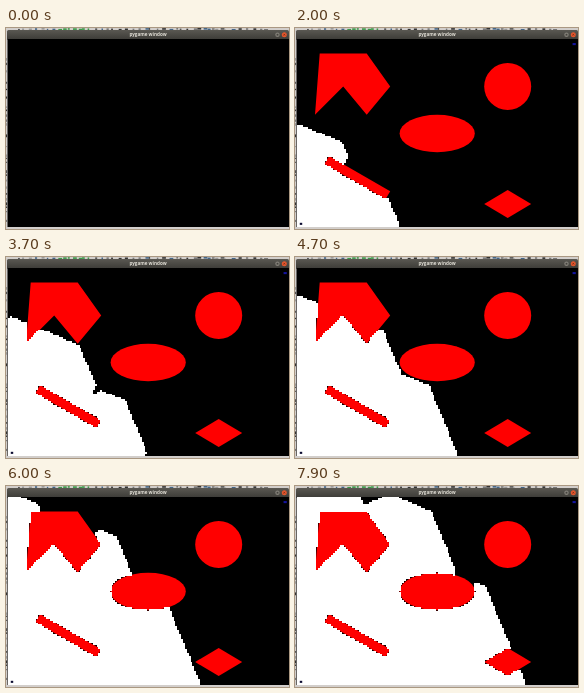
An HTML page that plays this animation: 283x201 px, repeating every 8 s.

```html
<!DOCTYPE html>
<html lang="en">
<head>
<meta charset="utf-8">
<title>Path search</title>
<style>
html, body { margin: 0; width: 100%; height: 100%; overflow: hidden; background: #d2cecb; }
svg { display: block; width: 100%; height: 100%; }
</style>
</head>
<body>
<svg viewBox="0 0 283 201">
  <defs>
    <linearGradient id="bar" x2="0" y2="1">
      <stop offset="0" stop-color="#5a5852"/>
      <stop offset="1" stop-color="#3b3a36"/>
    </linearGradient>
    <clipPath id="view"><rect x="2" y="11" width="281" height="188"/></clipPath>
  </defs>
  <rect width="283" height="201" fill="#d2cecb"/>
  <g id="flecks"></g>
  <rect x="1" y="2" width="282" height="10" rx="1.5" fill="url(#bar)"/>
  <text x="142" y="8.4" font-family="'Open Sans', 'Noto Sans', sans-serif" font-size="4.6" font-weight="700" fill="#e2dfd6" text-anchor="middle">pygame window</text>
  <circle cx="271.5" cy="6.7" r="2.2" fill="#85827a"/>
  <rect x="270.6" y="5.8" width="1.8" height="1.8" fill="#44423d"/>
  <circle cx="278.3" cy="6.7" r="2.5" fill="#e4572e"/>
  <path d="M277.4 5.8l1.8 1.8m0-1.8l-1.8 1.8" stroke="#6b2410" stroke-width=".6"/>
  <rect x="1.5" y="11" width="281.5" height="188" fill="#000"/>
  <g id="scene" clip-path="url(#view)">
    <g transform="translate(1.2 199.5) scale(.94 -.94)">
      <g id="shapes" fill="#f00"></g>
      <path id="flood" fill="#fff" shape-rendering="crispEdges"/>
      <rect x="3.8" y="2.8" width="2.6" height="2.2" fill="#0a0a30"/>
      <rect x="294" y="194" width="3.4" height="2.2" fill="#1414a0"/>
    </g>
  </g>
</svg>
<script>
const LOOP = 8000, STEP = 100, CELL = 2, COLS = 151, ROWS = 101, START = 4;
const $ = id => document.getElementById(id);

const polys = [
  [[25, 185], [75, 185], [100, 150], [75, 120], [50, 150], [20, 120]],
  [[30, 67.5], [35, 76], [100, 38.6], [95, 30]],
  [[225, 10], [200, 25], [225, 40], [250, 25]]
];
const ovals = [[225, 150, 25, 25], [150, 100, 40, 20]];

$('shapes').innerHTML =
  polys.map(p => `<polygon points="${p.join(' ')}"/>`).join('') +
  ovals.map(([x, y, a, b]) => `<ellipse cx="${x}" cy="${y}" rx="${a}" ry="${b}"/>`).join('');

function inPoly(p, x, y) {
  let inside = false;
  p.forEach(([ax, ay], i) => {
    const [bx, by] = p[(i + 1) % p.length];
    if ((ay > y) !== (by > y) && x < ax + (bx - ax) * (y - ay) / (by - ay)) inside = !inside;
  });
  return inside;
}
const blocked = (x, y) => polys.some(p => inPoly(p, x, y)) ||
  ovals.some(([cx, cy, a, b]) => ((x - cx) / a) ** 2 + ((y - cy) / b) ** 2 <= 1);

// Shortest 8-way distance from the start, relaxed in alternating sweeps.
function distances() {
  const n = COLS * ROWS, dist = new Float64Array(n).fill(Infinity), wall = [];
  for (let i = 0; i < n; i++) wall[i] = blocked(i % COLS * CELL, Math.floor(i / COLS) * CELL);
  dist[START / CELL * (COLS + 1)] = 0;
  let changed = true;
  const relax = i => {
    if (wall[i]) return;
    const x = i % COLS, y = Math.floor(i / COLS);
    for (let dy = -1; dy <= 1; dy++) for (let dx = -1; dx <= 1; dx++) {
      const u = x + dx, v = y + dy;
      if (u < 0 || v < 0 || u >= COLS || v >= ROWS) continue;
      const d = dist[v * COLS + u] + CELL * Math.hypot(dx, dy);
      if (d < dist[i] - 1e-9) { dist[i] = d; changed = true; }
    }
  };
  while (changed) {
    changed = false;
    for (let i = 0; i < n; i++) relax(i);
    for (let i = n - 1; i >= 0; i--) relax(i);
  }
  return dist;
}
const dist = distances();

// Time and screen x of the front along the bottom edge.
const front = [[400, 7], [900, 58], [2000, 105], [2900, 128], [3700, 142], [4700, 163],
  [5600, 186], [6500, 205], [7400, 223], [7900, 231]];
const reach = x => (x - 1.2) / .94 - START - 1;

function radius(t) {
  if (t < front[0][0]) return -1;
  let i = 0;
  while (i < front.length - 2 && t > front[i + 1][0]) i++;
  const [t0, x0] = front[i], [t1, x1] = front[i + 1];
  const a = reach(x0) ** 2, b = reach(x1) ** 2;
  return Math.sqrt(a + (b - a) * (t - t0) / (t1 - t0));
}

function floodPath(r) {
  let d = '';
  for (let y = 0; y < ROWS; y++) {
    for (let x = 0; x < COLS; x++) {
      const from = x;
      while (x < COLS && dist[y * COLS + x] <= r) x++;
      if (x > from) {
        const w = (x - from) * CELL;
        d += `M${from * CELL - 1} ${y * CELL - 1}h${w}v${CELL}h${-w}z`;
      }
    }
  }
  return d;
}

// Slivers of the desktop behind the window.
function flecks() {
  let seed = 7, out = '';
  const rnd = () => (seed = seed * 16807 % 2147483647) / 2147483647;
  const tones = ['#555', '#777', '#333', '#999', '#468'];
  const dot = (x, y, w, h, c) => {
    out += `<rect x="${x}" y="${y}" width="${w}" height="${h}" fill="${c}"/>`;
  };
  for (let x = 12; x < 262; x += 3 + rnd() * 5) {
    const tone = x > 52 && x < 86 ? '#3a9a48' : tones[Math.floor(rnd() * 5)];
    dot(x, rnd(), 1 + rnd() * 3, 1.6, tone);
  }
  for (let y = 30; y < 196; y += 3 + rnd() * 9) dot(0, y, 1, 1 + rnd() * 2, tones[Math.floor(rnd() * 4)]);
  $('flecks').innerHTML = out;
}
flecks();

let last = -1;
function draw(now) {
  const t = Math.floor(now % LOOP / STEP) * STEP;
  if (t !== last) {
    last = t;
    $('scene').style.display = t < 300 ? 'none' : '';
    $('flood').setAttribute('d', floodPath(radius(t)));
  }
}
const begin = performance.now();
function tick() {
  draw(performance.now() - begin);
  requestAnimationFrame(tick);
}
tick();
</script>
</body>
</html>
```
